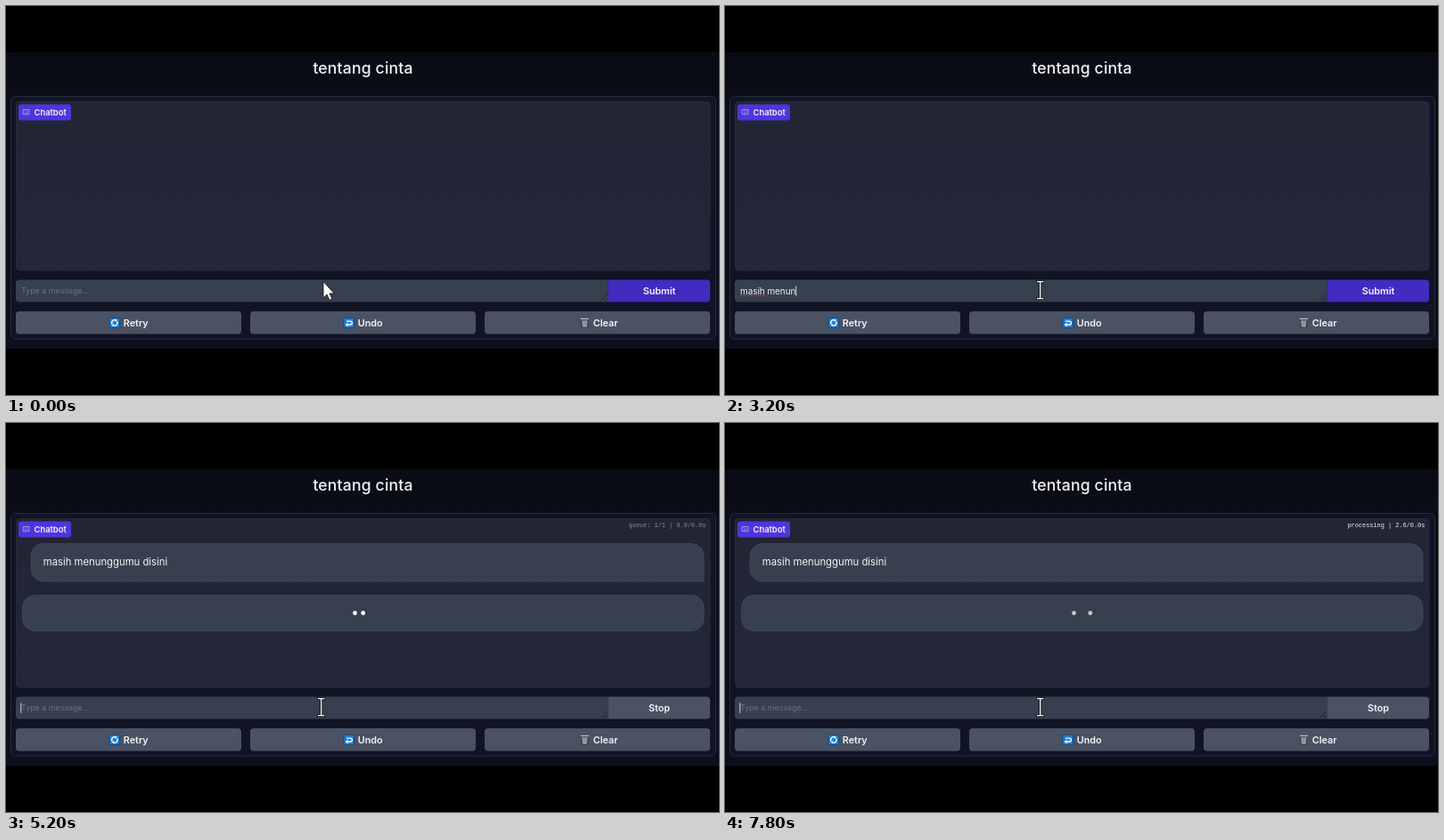
These frames come from a looping animation (800 px wide and 437 px high, 8 s). An HTML page:

```html
<!DOCTYPE html>
<html lang="id">
<head>
<meta charset="utf-8">
<title>tentang cinta</title>
<style>
  html, body { margin: 0; width: 100%; height: 100%; overflow: hidden; background: #000; }
  svg { display: block; width: 100vw; height: 100vh; }
  text { font-family: Inter, "Open Sans", sans-serif; fill: #f3f4f6; white-space: pre; }
  .button { font-size: 10.8px; font-weight: 600; }
  .entry { font-size: 9.9px; fill: #eceef2; }
  .hint { font-size: 8.9px; fill: #6b7280; }
  .status { font: 6.9px "Liberation Mono", "DejaVu Sans Mono", monospace; }
  .spell { stroke: #d5303c; stroke-width: 1.1; stroke-dasharray: 1.2 .8; }
</style>
</head>
<body>
<svg viewBox="0 0 800 437">
  <defs>
    <linearGradient id="page" x2="0" y2="1">
      <stop stop-color="#0a0c15"/><stop offset="1" stop-color="#0c0f1e"/>
    </linearGradient>
    <linearGradient id="panel" x2="0" y2="1">
      <stop stop-color="#212534"/><stop offset="1" stop-color="#232739"/>
    </linearGradient>
  </defs>
  <rect width="800" height="437"/>
  <rect y="52" width="800" height="333" fill="url(#page)"/>
  <text x="400.5" y="76" text-anchor="middle" font-size="17.6" font-weight="500" letter-spacing=".15">tentang cinta</text>

  <rect x="5.5" y="101.5" width="791" height="272.5" rx="5" fill="#111424" stroke="#272c3c"/>
  <rect x="11.5" y="107.5" width="778.5" height="189.5" rx="4" fill="url(#panel)" stroke="#272c3d"/>
  <rect x="14" y="110.5" width="59" height="18" rx="3" fill="#5034dc"/>
  <g fill="none" stroke="#b9b0f4" stroke-width=".8">
    <path d="M19.2 116.5h6.8v5h-2.4l-1 1.3-1-1.3h-2.4z"/>
    <path d="M21 118.2h.9M23.3 118.2h.9M21 119.8q1.6 1 3.2 0"/>
  </g>
  <text x="31.5" y="122.5" font-size="9.4" font-weight="600">Chatbot</text>

  <g id="chat">
    <path d="M42 135.5H769a14 14 0 0 1 14 14V178H42a14 14 0 0 1-14-14V149.5a14 14 0 0 1 14-14z" fill="#37404f" stroke="#434b5b" stroke-width=".8"/>
    <text x="41.8" y="160.2" font-size="11.3">masih menunggumu disini</text>
    <rect x="18.5" y="193.5" width="764.5" height="40" rx="14" fill="#37404f" stroke="#434b5b" stroke-width=".8"/>
    <g id="dots" fill="#f9fafb">
      <circle cx="391.5" cy="213.5" r="2.4"/>
      <circle cx="400.7" cy="213.5" r="2.4"/>
      <circle cx="409.8" cy="213.5" r="2.4"/>
    </g>
    <text id="status" class="status" x="785.3" y="116.8" text-anchor="end"></text>
  </g>

  <path d="M675.5 307.5H15a4 4 0 0 0-4 4V328.500a4 4 0 0 0 4 4H675.500z" fill="#37404f"/>
  <path d="M667 331.500l7.500-7.500M671.500 331.500l3-3" stroke="#161a22" stroke-width=".8"/>
  <path id="sendBox" d="M675.500 307.500H786a4 4 0 0 1 4 4V328.500a4 4 0 0 1-4 4H675.500z"/>
  <text id="sendLabel" class="button" x="733" y="324" text-anchor="middle"></text>
  <text id="hint" class="hint" x="17" y="323.3">Type a message...</text>
  <text id="entry" class="entry" x="17" y="323.5"></text>
  <line id="spell1" class="spell" x1="17" y1="325.4" y2="325.4"/>
  <line id="spell2" class="spell" y1="325.4" y2="325.4"/>
  <rect id="caret" y="314.5" width=".9" height="11.200" fill="#e5e7eb"/>

  <g fill="#4b5263">
    <rect x="11" y="343" width="253" height="25.500" rx="4"/>
    <rect x="274" y="343" width="253" height="25.500" rx="4"/>
    <rect x="537" y="343" width="253" height="25.500" rx="4"/>
  </g>
  <g class="button">
    <text x="131.800" y="360">Retry</text>
    <text x="394.800" y="360">Undo</text>
    <text x="658.800" y="360">Clear</text>
  </g>
  <g fill="#1c7fd6" stroke="#0c3f7c" stroke-width=".8">
    <rect x="116" y="350.300" width="11.600" height="11.200" rx="1"/>
    <rect x="379" y="350.300" width="11.600" height="11.200" rx="1"/>
  </g>
  <g fill="none" stroke="#fff" stroke-width="1.300">
    <path d="M119.200 357.500a3 3 0 0 1 4-4.300M124.500 354.300a3 3 0 0 1-4 4.300"/>
    <path d="M382 354.200h4.500a1.800 1.800 0 0 1 0 3.800h-4.800"/>
  </g>
  <path d="M122.600 351.600l2.300 1.500-2.300 1.700zM121.100 357l-2.300 1.500 2.300 1.700zM383.600 355.800l-3 2.200 3 2.200z" fill="#fff"/>
  <path d="M645.200 352.200l1.200 9.300h5.800l1.200-9.300z" fill="#6f747d" stroke="#252932" stroke-width=".7"/>
  <path d="M647.200 353.500l.7 7M649.300 353.500v7M651.400 353.500l-.7 7" stroke="#c5c9d0" stroke-width=".7"/>
  <rect x="644.200" y="350.300" width="10.200" height="2.200" rx="1" fill="#b9bec7" stroke="#252932" stroke-width=".6"/>

  <path id="arrow" d="M356 309.500v18.500l4.100-3.900 2.800 6.300 3-1.300-2.800-6.200h5.200z" fill="#fff" stroke="#15181f" stroke-width=".9"/>
  <g id="beam" fill="none">
    <path d="M-4.500-9.500h9M-4.500 9.500h9M0-9.500v19" stroke="#11141b" stroke-width="3"/>
    <path d="M-3.700-9.500h7.400M-3.700 9.500h7.400M0-9.500v19" stroke="#fff" stroke-width="1.300"/>
  </g>
</svg>
<script>
const LOOP = 8000, TICK = 200, BLINK = 530;
const CLICK = 600, TYPE = 1800, SEND = 5200;
const MESSAGE = "masih menunggumu disini";
// Number of characters present at each tick after TYPE.
const TYPED = [2, 3, 5, 6, 8, 9, 10, 11, 12, 14, 15, 16, 18, 20, 22, 23, 23];

const $ = id => document.getElementById(id);
const show = (id, on) => $(id).setAttribute("visibility", on ? "visible" : "hidden");
const set = (id, attrs) => {
  for (const name in attrs) $(id).setAttribute(name, attrs[name]);
};
const blinkOn = elapsed => elapsed >= 0 && elapsed % (2 * BLINK) < BLINK;
const smooth = p => p * p * (3 - 2 * p);

function drawPointer(t) {
  show("arrow", t < TICK);
  show("beam", t >= TICK);
  const p = smooth(Math.min(1, Math.max(0, (t - TICK) / 1200)));
  set("beam", { transform: `translate(${357 - 3.3 * p} ${312.5 + 6.7 * p})` });
}

function drawEntry(t) {
  const typing = t >= TYPE && t < SEND;
  const count = typing ? TYPED[(t - TYPE) / TICK] : 0;
  const entry = $("entry");
  entry.textContent = MESSAGE.slice(0, count);
  show("hint", !typing);
  show("spell1", count > 5);
  show("spell2", count > 16);
  if (count > 5) set("spell1", { x2: 17 + entry.getSubStringLength(0, 5) });
  if (count > 16) set("spell2", {
    x1: 17 + entry.getSubStringLength(0, 6),
    x2: 17 + entry.getSubStringLength(0, 16)
  });
  set("caret", { x: count ? 17 + entry.getComputedTextLength() : 16.4 });
  show("caret", typing ? t < 5000 : blinkOn(t - (t < SEND ? CLICK : SEND)));
}

function drawChat(t) {
  const sent = t >= SEND, queued = t < SEND + TICK;
  show("chat", sent);
  $("sendLabel").textContent = sent ? "Stop" : "Submit";
  set("sendBox", { fill: sent ? "#4b5263" : "#432ac0" });
  const seconds = Math.max(0, (t - SEND) / 1000).toFixed(1);
  $("status").textContent = `${queued ? "queue: 1/1" : "processing"} | ${seconds}/0.0s`;
  $("status").style.fill = queued ? "#858b98" : "#f3f4f6";
  [...$("dots").children].forEach((dot, i) => {
    const phase = (t / 1000 + .53 - i * .33) % 1;
    const flash = smooth(1 - Math.abs(2 * phase - 1));
    dot.setAttribute("opacity", queued ? +(i < 2) : flash);
  });
}

function frame(now) {
  const t = Math.floor(now % LOOP / TICK) * TICK;
  drawPointer(t);
  drawEntry(t);
  drawChat(t);
  requestAnimationFrame(() => frame(performance.now() - start));
}
const start = performance.now();
frame(0);
</script>
</body>
</html>
```
